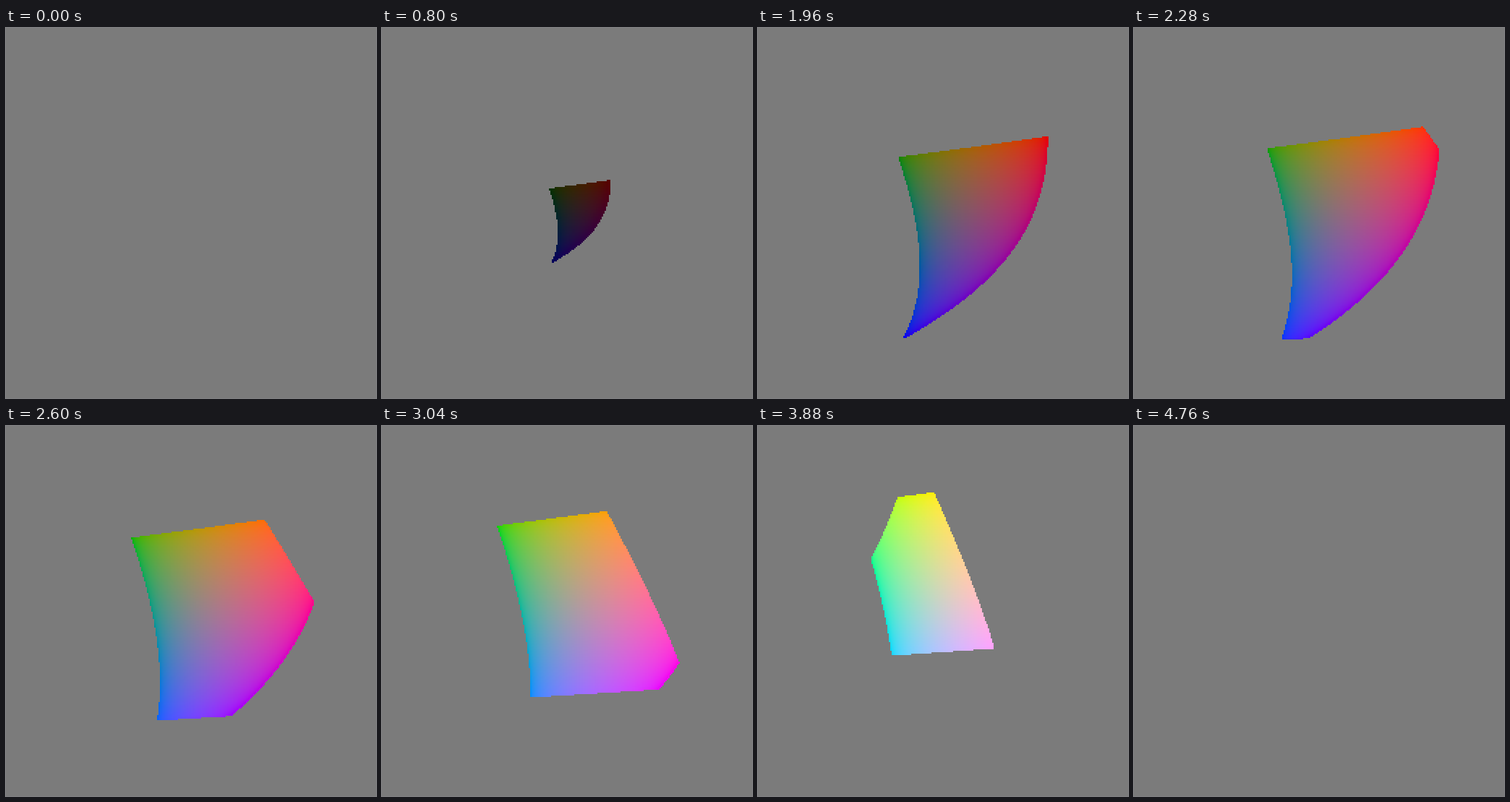
Recreate the animation shown at these times as an HTML page with a canvas. Size 512 by 512 pixels, loop 4800 ms.

```html
<!DOCTYPE html>
<html lang="en">
<head>
<meta charset="utf-8">
<title>sRGB gamut in IPT</title>
<style>
  html, body { margin: 0; width: 100%; height: 100%; overflow: hidden; background: #7b7b7b; }
  canvas { display: block; width: 100vw; height: 100vh; image-rendering: pixelated; }
</style>
</head>
<body>
<canvas id="stage" width="512" height="512"></canvas>
<script>
const STEPS = 120, STEP_MS = 40, GRID = 256, HALF = GRID / 2;

const expand = v => Math.sign(v) * Math.abs(v) ** (1 / 0.43);
const encode = v => v <= 0.0031308 ? 12.92 * v : 1.055 * v ** (1 / 2.4) - 0.055;

// IPT to cone response to linear sRGB.
function toLinear(i, p, t) {
  const l = expand(i + 0.0976 * p + 0.2052 * t);
  const m = expand(i - 0.1139 * p + 0.1332 * t);
  const s = expand(i + 0.0326 * p - 0.6769 * t);
  return [
    5.432 * l - 4.679 * m + 0.247 * s,
    -1.105 * l + 2.311 * m - 0.206 * s,
    0.028 * l - 0.195 * m + 1.167 * s
  ];
}

const ctx = document.getElementById('stage').getContext('2d');
const slice = document.createElement('canvas');
slice.width = slice.height = GRID;
const sliceCtx = slice.getContext('2d');
const image = sliceCtx.createImageData(GRID, GRID);

// Plane of constant intensity: P runs right, T runs up.
function fillSlice(intensity) {
  const px = image.data;
  px.fill(0);
  if (intensity > 0 && intensity < 1) {
    for (let y = 0; y < GRID; y++) {
      const t = (HALF - 2.5 - y) / HALF;
      for (let x = 0; x < GRID; x++) {
        const p = (x + 0.5 - HALF) / HALF;
        const rgb = toLinear(intensity, p, t);
        if (rgb.some(v => v < 0 || v > 1)) continue;
        const at = (y * GRID + x) * 4;
        rgb.forEach((v, c) => { px[at + c] = 255 * encode(v); });
        px[at + 3] = 255;
      }
    }
  }
  sliceCtx.putImageData(image, 0, 0);
}

// Each cell is a 3 px square on a 2 px pitch, so neighbours overlap.
function drawSlice() {
  ctx.fillStyle = '#7b7b7b';
  ctx.fillRect(0, 0, 512, 512);
  ctx.imageSmoothingEnabled = false;
  for (let dy = 1; dy >= 0; dy--) {
    for (let dx = 1; dx >= 0; dx--) ctx.drawImage(slice, 1 + dx, dy, 512, 512);
  }
}

let shown = -1;
function tick() {
  const step = Math.floor(performance.now() / STEP_MS) % STEPS;
  if (step !== shown) {
    shown = step;
    fillSlice(step / (STEPS - 1));
    drawSlice();
  }
  requestAnimationFrame(tick);
}
tick();
</script>
</body>
</html>
```
